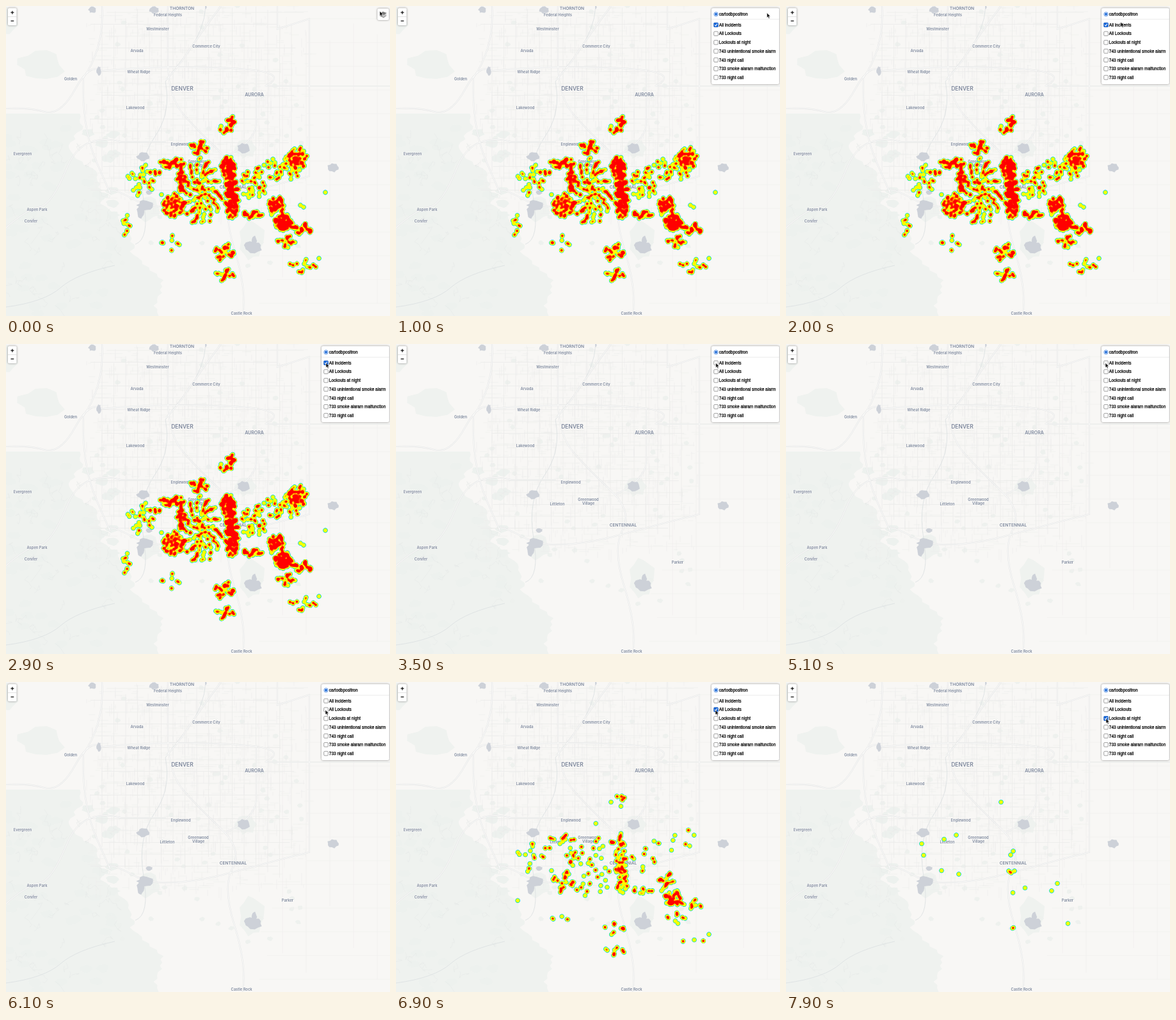
Write an HTML page with a canvas that moves like this. It is 600 px wide and 484 px high and loops after 8 s.

```html
<!DOCTYPE html>
<html lang="en">
<head>
<meta charset="utf-8">
<title>Incident heat map</title>
<style>
html, body { margin: 0; width: 100%; height: 100%; overflow: hidden; background: #f8f7f5; }
svg, canvas { position: absolute; left: 0; top: 0; width: 600px; height: 484px; }
.place { font: 600 5.8px Inter, "Open Sans", sans-serif; fill: #7d879b; text-anchor: middle;
  stroke: #fafaf9; stroke-width: 1px; paint-order: stroke; }
.menu { font: 6.5px "Liberation Sans", Arial, sans-serif; fill: #111; stroke: #111; stroke-width: .28px; }
.shade { filter: drop-shadow(0 .5px 1.5px #0007); }
</style>
</head>
<body>
<svg id="map" viewBox="0 0 600 484"></svg>
<svg id="ui" viewBox="0 0 600 484"></svg>
<script>
const W = 600, H = 484, LOOP = 8000, STEP = 100;
const $ = id => document.getElementById(id);
const clamp = v => Math.min(1, Math.max(0, v));
const mix = (a, b, f) => a + (b - a) * f;
const times = (n, fn) => Array.from({ length: n }, (_, i) => fn(i));

function seeded(seed) {
  return () => {
    seed = (seed + 0x6D2B79F5) | 0;
    let t = Math.imul(seed ^ (seed >>> 15), 1 | seed);
    t = (t + Math.imul(t ^ (t >>> 7), 61 | t)) ^ t;
    return ((t ^ (t >>> 14)) >>> 0) / 4294967296;
  };
}

// ---- Base map ----
const rnd = seeded(12);
const between = (a, b) => mix(a, b, rnd()).toFixed(1);
const stroke = (d, color, width) => `<path d="${d}" fill="none" stroke="${color}" stroke-width="${width}"/>`;
const fill = (d, color) => `<path d="${d}" fill="${color}"/>`;

// Ragged closed shape around a centre.
function blob(x, y, rx, ry, rough = .35) {
  const n = 14;
  return 'M' + times(n, i => {
    const a = i / n * 2 * Math.PI, r = 1 - rough * rnd();
    return `${(x + rx * r * Math.cos(a)).toFixed(1)} ${(y + ry * r * Math.sin(a)).toFixed(1)}`;
  }).join('L') + 'z';
}

function foothills() {
  const edge = times(64, i => {
    const y = 168 + i * 5, slope = clamp((y - 225) / 215);
    return `L${(104 + 132 * slope + 9 * Math.sin(y / 13) + rnd() * 10).toFixed(1)} ${y}`;
  });
  return `M0 168${edge.join('')}V484H0z`;
}

function streets() {
  let fine = '';
  for (let i = 0; i < 1700; i++) {
    const x = mix(125, 470, rnd()), y = rnd() * 325;
    const density = Math.exp(-(((x - 280) / 170) ** 2) - ((y - 150) / 170) ** 2);
    if (rnd() > density + .15) continue;
    const snap = v => Math.round(v / 3) * 3;
    fine += rnd() < .5 ? `M${x.toFixed(1)} ${snap(y)}h${between(4, 20)}` : `M${snap(x)} ${y.toFixed(1)}v${between(4, 20)}`;
  }
  const avenues = times(17, i => `M${150 + i * 18.5} ${between(0, 30)}V${between(250, 310)}`) +
    times(16, i => `M${between(130, 160)} ${10 + i * 18.5}H${between(400, 470)}`);
  const rural = times(6, i => `M${395 + i * 37} ${between(0, 90)}V${between(300, 484)}`) +
    times(13, i => `M${i < 8 ? 470 : between(370, 420)} ${20 + i * 37}H600`);
  const trails = times(48, () => `M${between(0, 175)} ${between(185, 470)}` +
    times(6, () => `l${between(-7, 7)} ${between(-6, 8)}`).join(''));
  return stroke(rural, '#f0efee', .8) + stroke(trails, '#e6eae7', .6) +
    stroke(fine, '#ececeb', .6) + stroke(avenues, '#ebebea', .8);
}

const highways = [
  'M253 0V98Q256 145 278 170T335 228T354 290T357 380T370 484',
  'M0 160Q35 158 60 165T108 130T150 101Q250 92 350 97T405 125H600',
  'M150 0Q154 65 121 112Q118 190 142 245T162 290T202 303T354 297T474 266V20L424 36V0',
  'M391 98V185Q389 212 342 236',
  'M0 346Q32 318 52 314T95 253T180 212H250',
  'M336 0Q300 48 282 75T250 115'
].join('');
const rivers = 'M312 0Q310 38 284 72T249 118Q259 166 232 205T215 304T202 372M0 470Q60 462 85 440T170 405';

// Lakes: centre and radii.
const lakes = [[371, 222, 12, 10], [214, 235, 11, 8], [217, 311, 14, 9], [210, 322, 7, 12], [385, 377, 17, 10],
  [388, 367, 5, 9], [511, 252, 10, 8], [135, 6, 7, 6], [231, 6, 9, 6], [145, 101, 4, 8], [224, 291, 6, 4]];
const ponds = times(22, i => blob(+between(-4, 4) + 314 - i, 2 + i * 3.5, 1.5, 3)) +
  times(22, () => blob(+between(130, 350), +between(0, 170), 2, 2));
const greens = [[383, 366, 24, 38], [374, 222, 20, 18], [55, 92, 42, 24], [0, 20, 24, 26], [222, 318, 20, 22]];

const places = [
  ['THORNTON', 275, 6, 6.7], ['Federal Heights', 253, 16], ['Westminster', 237, 37.5], ['Arvada', 204.5, 72],
  ['Commerce City', 313, 64.5], ['Wheat Ridge', 207.5, 105], ['Golden', 101, 115.5], ['DENVER', 275.5, 131.5, 8.5],
  ['AURORA', 388, 140.5, 7], ['Lakewood', 202, 160.5], ['Englewood', 273, 218], ['Evergreen', 26, 233],
  ['Littleton', 252, 251.5], ['Greenwood', 300.5, 245], ['Village', 300.5, 251], ['CENTENNIAL', 355, 284.8, 6.6],
  ['Aspen Park', 48.5, 319.5], ['Conifer', 39, 338], ['Parker', 440, 342.5], ['Castle Rock', 368, 482]
];

$('map').innerHTML =
  fill(foothills() + greens.map(g => blob(...g)).join(''), '#eff2ef') +
  fill(times(60, () => blob(+between(0, 170), +between(190, 480), 12, 7)).join(''), '#edf1ee') +
  fill(times(70, () => blob(+between(130, 470), +between(0, 410), 5, 4)).join(''), '#eef1ee') +
  streets() + stroke(rivers, '#dde1e3', .9) +
  stroke(highways, '#e2e3e3', 2.2) + stroke(highways, '#fbfbfa', 1.1) +
  fill(lakes.map(l => blob(...l)).join('') + ponds, '#cdd1d8') +
  places.map(([name, x, y, size = 5.8]) =>
    `<text class="place" x="${x}" y="${y}" style="font-size:${size}px">${name}</text>`).join('');

// ---- Heat layers ----
// Areas: centre, radii, number of calls, and how many of those are lockouts.
const areas = [
  [352, 180, 6, 9, 13, 4], [344, 194, 9, 4, 10, 1], [302, 221, 14, 12, 24, 1], [211, 272, 21, 27, 24, 12],
  [233, 260, 8, 4, 7, 2], [188, 340, 5, 24, 8, 1], [260, 246, 20, 9, 30, 10], [273, 272, 5, 22, 22, 6],
  [262, 312, 19, 18, 52, 20], [304, 290, 33, 53, 125, 34], [347, 253, 12, 18, 56, 14], [353, 297, 10, 36, 95, 34],
  [387, 277, 21, 28, 34, 8], [385, 326, 15, 7, 19, 9], [432, 253, 30, 23, 34, 7], [456, 238, 14, 19, 42, 2],
  [423, 311, 14, 14, 40, 16], [433, 338, 14, 13, 62, 34], [463, 348, 17, 9, 24, 10], [438, 368, 15, 11, 16, 7],
  [465, 405, 22, 13, 13, 3], [340, 384, 16, 14, 24, 8], [342, 420, 16, 10, 16, 8], [258, 372, 16, 20, 7, 3]
];
const outliers = [[499, 291], [460, 311], [465, 314], [489, 394]];
const nightSpots = [[336, 187.5], [266, 239], [247, 245.5], [212, 252.5], [215, 270.5], [355, 264], [351, 270], [243, 294.5],
  [270, 300], [348, 295], [350.5, 297], [352, 298], [357, 295], [373.5, 321.5], [354.5, 329], [424, 314.5], [415, 326],
  [440.5, 377], [355.5, 383.5], [354, 384.5]];

// Spreads calls evenly over an area; some addresses call again.
function scatter([cx, cy, rx, ry, calls], seed) {
  const rnd = seeded(seed + 40), jitter = size => (rnd() - .5) * size;
  return times(calls, i => {
    const angle = i * .7549 * 2 * Math.PI, r = Math.sqrt((.5 + i * .5698) % 1);
    const x = cx + rx * r * Math.cos(angle) + jitter(3), y = cy + ry * r * Math.sin(angle) + jitter(3);
    return rnd() < .5 ? [[x, y], [x + jitter(3), y + jitter(3)]] : [[x, y]];
  });
}

// Colour stops: heat, red, green, blue.
const stops = [[0, 60, 150, 255], [.14, 0, 215, 225], [.25, 110, 255, 80], [.36, 250, 255, 0],
  [.64, 255, 250, 0], [.78, 255, 60, 0], [.86, 255, 0, 0], [1.1, 255, 0, 0]];
function heatColor(v) {
  const k = stops.findIndex(s => s[0] > v), a = stops[k - 1], b = stops[k];
  return [1, 2, 3].map(c => mix(a[c], b[c], (v - a[0]) / (b[0] - a[0])));
}

function heatLayer(spots) {
  const canvas = document.createElement('canvas');
  canvas.width = W;
  canvas.height = H;
  const clear = new Float32Array(W * H).fill(1);
  for (const [x, y] of spots)
    for (let py = Math.floor(y) - 5; py <= y + 5; py++)
      for (let px = Math.floor(x) - 5; px <= x + 5; px++) {
        const d = Math.hypot(px + .5 - x, py + .5 - y);
        clear[py * W + px] *= 1 - .6 * clamp((4.2 - d) / 2.9);
      }
  const ctx = canvas.getContext('2d'), image = ctx.createImageData(W, H);
  clear.forEach((c, i) => {
    if (c < 1) image.data.set([...heatColor(1 - c), clamp((1 - c) * 6) * 255], i * 4);
  });
  ctx.putImageData(image, 0, 0);
  document.body.insertBefore(canvas, $('ui'));
  return canvas;
}

const calls = areas.map(scatter);
const lockouts = calls.flatMap((list, i) => list.slice(0, areas[i][5]).flat());
const layers = [
  [...calls.flat(2), ...nightSpots, ...outliers],
  [...lockouts, ...nightSpots, outliers[3]],
  nightSpots
].map(heatLayer);

// ---- Controls ----
const options = ['All incidents', 'All Lockouts', 'Lockouts at night', '743 unintentional smoke alarm',
  '743 night call', '733 smoke alaram malfunction', '733 night call'];

const optionRow = (label, i) => `<g transform="translate(500 ${29.5 + i * 13.68})">
  <rect x="-3.3" y="-3.3" width="6.6" height="6.6" rx="1.2" fill="#fff" stroke="#777" stroke-width=".7"/>
  <g class="tick"><rect x="-3.6" y="-3.6" width="7.2" height="7.2" rx="1.3" fill="#1a68d8"/>
  <path d="M-2 0l1.5 1.7 2.5-3.6" fill="none" stroke="#fff" stroke-width="1.1"/></g>
  <text class="menu" x="4.8" y="2.3">${label}</text></g>`;

const sheet = (y, color) => `<path d="M583.3 ${y}l5.7-3 6.3 2.2-5.3 4z" fill="${color}" stroke="#fff" stroke-width=".5"/>`;

$('ui').innerHTML = `
  <rect class="shade" x="3" y="3.2" width="13.6" height="27" rx="2" fill="#fff"/>
  <path d="M3 16.7h13.6" stroke="#ccc" stroke-width=".6"/>
  <path d="M7.4 10.2h5M9.9 7.7v5M7.5 23.4h4.8" stroke="#111" stroke-width="1.2"/>
  <g id="button"><rect class="shade" x="580.3" y="4" width="18" height="18" rx="2.5" fill="#fff"/>
    ${sheet(15.6, '#8a8a8a')}${sheet(13.6, '#b5b5b5')}${sheet(11.6, '#777')}</g>
  <g id="panel"><rect class="shade" x="493" y="3.3" width="105.8" height="118.7" rx="2.8" fill="#fff"/>
    <circle cx="500" cy="12.8" r="3.2" fill="#fff" stroke="#1a68d8" stroke-width=".7"/>
    <circle cx="500" cy="12.8" r="2" fill="#1a68d8"/>
    <text class="menu" x="504.8" y="15.1">cartodbpositron</text>
    <path d="M493 20.7h105.8" stroke="#ddd" stroke-width=".6"/>${options.map(optionRow).join('')}</g>
  <path id="cursor" d="M0 0v7.4l1.7-1.5 1.3 2.8 1.3-.6-1.3-2.7h2.4z" fill="#111" stroke="#fff" stroke-width=".5"/>`;

// ---- Timeline ----
// Pointer steps: time, x, y.
const pointer = [[0, 584, 8], [1800, 576, 13], [2000, 523, 25], [2700, 500, 29.5], [5300, 499, 29.5],
  [5800, 499, 43.5], [7300, 499, 44], [7700, 500, 57], [LOOP, 500, 57]];
// Spans of time in which each layer is ticked.
const shown = [[[0, 3000], [4100, 5000]], [[6200, 7200]], [[7900, LOOP]]];
const ticks = document.querySelectorAll('.tick');
const show = (el, on) => { el.style.display = on ? '' : 'none'; };

function pointerAt(t) {
  const k = pointer.findIndex(p => p[0] > t), a = pointer[k - 1], b = pointer[k];
  return [1, 2].map(c => mix(a[c], b[c], (t - a[0]) / (b[0] - a[0])));
}

function draw(t) {
  show($('panel'), t >= STEP);
  show($('button'), t < STEP);
  ticks.forEach((tick, i) => {
    const on = (shown[i] || []).some(([from, to]) => t >= from && t < to);
    show(tick, on);
    if (layers[i]) show(layers[i], on);
  });
  $('cursor').setAttribute('transform', `translate(${pointerAt(t)})`);
}

const start = performance.now();
function frame() {
  const t = (performance.now() - start) % LOOP;
  draw(Math.floor(t / STEP) * STEP);
  requestAnimationFrame(frame);
}
frame();
</script>
</body>
</html>
```
